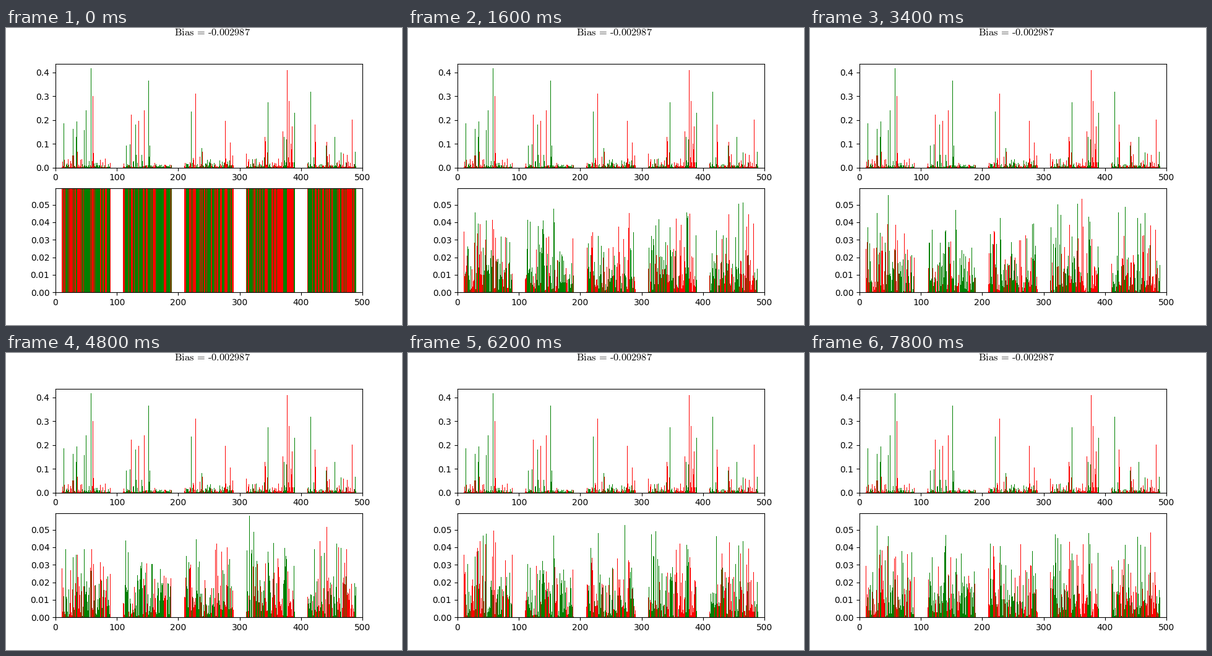
Write a matplotlib script that moves like this. It is 640 by 480 pixels and loops after 8 s.

```python
import numpy as np
import matplotlib.pyplot as plt
from matplotlib.animation import FuncAnimation

plt.rcParams["font.family"] = "DejaVu Sans"
plt.rcParams["mathtext.fontset"] = "cm"

FRAMES, INTERVAL = 40, 200
GROUPS, GROUP, STEP = 5, 80, 100
TOP_MAX, LOW_MAX = 0.4372, 0.0593

# Tallest bars of the upper chart: position and value, red above zero, green below.
PEAKS = {
    13: -.187, 28: -.163, 34: -.195, 46: -.158, 49: -.240, 57: -.417, 60: .300,
    123: .224, 130: -.182, 135: .198, 144: .241, 151: -.367,
    221: -.236, 228: .312, 276: .197,
    346: -.275, 370: .153, 377: .411, 380: .281, 385: .173, 389: -.231,
    415: -.320, 422: .180, 437: .155, 483: .203,
}

rng = np.random.default_rng(7)
x = np.concatenate([10 + STEP * g + np.arange(GROUP) for g in range(GROUPS)])
n = x.size

# Neighbouring bars tend to share a colour; every group starts red.
flip = rng.random((GROUPS, GROUP)) < 0.33
flip[:, 0] = False
red = (flip.cumsum(axis=1) % 2 == 0).ravel()

top = np.minimum(rng.lognormal(np.log(0.010), 1.2, n), 0.13)
for pos, value in PEAKS.items():
    i = np.searchsorted(x, pos)
    top[i], red[i] = abs(value), value > 0
colors = np.where(red, "red", "green")

# Lower chart: steady heights, a slow wander and a start-up transient.
base = np.abs(rng.normal(0, 0.016, n))
strong = rng.random(n) < 0.06
base = np.where(strong, rng.uniform(0.036, 0.047, n), np.minimum(base, 0.034))
noise = rng.normal(0, 0.007, (FRAMES, n))
for k in range(1, FRAMES):
    noise[k] += 0.5 * noise[k - 1]
transient = rng.normal(0, 1.1, n)


def heights(k):
    if k == 0:
        return np.full(n, 2 * LOW_MAX)
    return np.abs(base + noise[k] + transient * np.exp(-0.8 * k))


fig, (ax_top, ax_low) = plt.subplots(2, 1, figsize=(6.4, 4.8), dpi=100)
fig.text(272 / 640, 1 - 12 / 480,
         r"$\text{Bias}\hspace{0.38}\text{=}\hspace{0.38}\text{-0.002987}$",
         fontsize=11.75, ha="left", va="baseline")

ax_top.bar(x, top, width=1, align="edge", color=colors)
bars = ax_low.bar(x, heights(0), width=1, align="edge", color=colors)
for ax, limit in ((ax_top, TOP_MAX), (ax_low, LOW_MAX)):
    ax.set_xlim(0, 500)
    ax.set_ylim(0, limit)


def update(k):
    for bar, height in zip(bars, heights(k)):
        bar.set_height(height)
    return list(bars)


anim = FuncAnimation(fig, update, frames=FRAMES, interval=INTERVAL,
                     repeat=True, repeat_delay=0, blit=False)
plt.show()
```
